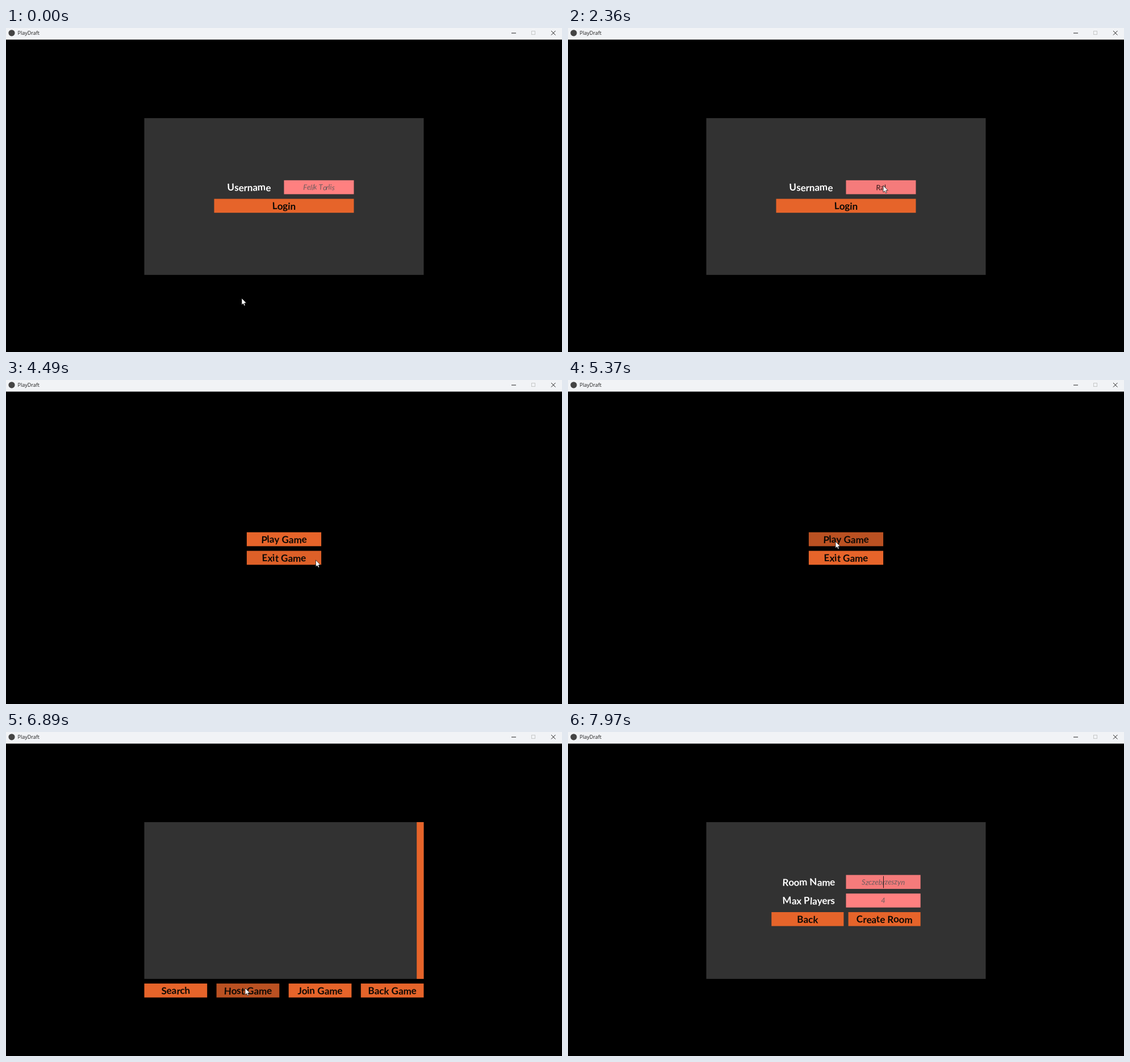
An HTML page with a canvas that plays this animation: 979 by 572 pixels, repeating every 8000 ms.

```html
<!DOCTYPE html>
<html lang="en">
<head>
<meta charset="utf-8">
<title>Game menu</title>
<style>
html, body { margin: 0; width: 100%; height: 100%; overflow: hidden; background: #000; }
canvas { display: block; width: 979px; height: 572px; }
</style>
</head>
<body>
<canvas id="stage" width="979" height="572"></canvas>
<script>
const ctx = document.getElementById('stage').getContext('2d');
const LOOP = 8000;
const ORANGE = [230, 100, 42], PINK = [255, 128, 128];
const LABEL = '700 17px Lato, sans-serif';
const INPUT = '13px Lato, sans-serif';

// Interface layout: everything is centred and measured in units
const UNIT = 0.82, CX = 489.5, CY = 297.5;
const ROW = 30 * UNIT, GAP = 10 * UNIT;
const PANEL_W = 600 * UNIT, PANEL_H = PANEL_W * 9 / 16;
const PANEL_X = CX - PANEL_W / 2, PANEL_Y = CY - PANEL_H / 2;
const rowY = (i, count) => CY - (count * (ROW + GAP) - GAP) / 2 + i * (ROW + GAP);

// Pointer glides between rests: start, end, evenly timed stops
const home = [415, 477];
const glides = [
  { from: 270, to: 1070, stops: [[551, 306], [555, 278]] },
  { from: 3170, to: 3210, stops: [[555, 284]] },
  { from: 3370, to: 3970, stops: [[550, 326], [546, 318]] },
  { from: 4450, to: 5290, stops: [[461, 298], [471, 285]] },
  { from: 5690, to: 5970, stops: [[488, 305], [482, 360], [350, 405]] },
  { from: 5970, to: 6530, stops: [[318, 430], [415, 444]] },
  { from: 6530, to: 6650, stops: [[421, 452]] },
  { from: 6930, to: 7610, stops: [[440, 410], [575, 268]] },
  { from: 7690, to: 7930, stops: [[930, 262]] }
];

const clamp = (v, lo, hi) => Math.min(hi, Math.max(lo, v));
const ease = u => u * u * (3 - 2 * u);

// Smooth curve through a, b with neighbours p, n
const curve = (p, a, b, n, u) => [0, 1].map(k => {
  const da = (b[k] - p[k]) / 2, db = (n[k] - a[k]) / 2, d = a[k] - b[k];
  return a[k] + u * (da + u * (-3 * d - 2 * da - db + u * (2 * d + da + db)));
});

function pointerAt(t) {
  let rest = home;
  for (const { from, to, stops } of glides) {
    if (t <= from) break;
    const pts = [rest, ...stops], last = pts.length - 1;
    const s = ease(clamp((t - from) / (to - from), 0, 1)) * last;
    const i = Math.min(Math.floor(s), last - 1);
    const at = j => pts[clamp(j, 0, last)];
    rest = curve(at(i - 1), at(i), at(i + 1), at(i + 2), s - i);
  }
  return rest;
}

let pointer = home;

const tint = (color, k) => `rgb(${color.map(c => Math.round(c * k)).join()})`;

function rect(x, y, w, h, fill) {
  ctx.fillStyle = fill;
  ctx.fillRect(x, y, w, h);
}

// Centred hand lettering: every letter leans and bounces a little
function lettering(str, x, y, font, fill) {
  ctx.font = font;
  ctx.fillStyle = fill;
  ctx.textAlign = 'left';
  const left = x - ctx.measureText(str).width / 2;
  [...str].forEach((ch, i) => {
    const sway = Math.sin(ch.charCodeAt(0) * 7 + i * 2.4);
    ctx.save();
    ctx.translate(left + ctx.measureText(str.slice(0, i)).width, y + sway * 0.5);
    ctx.rotate(sway * 0.05);
    ctx.fillText(ch, 0, 0);
    ctx.restore();
  });
}

function shadeFor(x, y, w) {
  const [px, py] = pointer;
  return px >= x && px < x + w && py >= y && py < y + ROW ? 0.96 : 1;
}

// Button darkening after a press
const pressed = (t, start, floor = 0.8) =>
  t < start ? 1 : Math.max(floor, 0.96 - (t - start) * 0.0037);

function button(label, x, y, w, press = 1) {
  rect(x, y, w, ROW, tint(ORANGE, Math.min(press, shadeFor(x, y, w))));
  lettering(label, x + w / 2, y + 18.8, LABEL, '#0b0805');
}

// Caption and input box sharing one row
function field(label, y, w, value, hint, caret) {
  const mid = CX + w / 2;
  lettering(label, CX - w / 2, y + 18.8, LABEL, '#fff');
  rect(CX, y, w, ROW, tint(PINK, caret ? 0.96 : shadeFor(CX, y, w)));
  if (value) lettering(value, mid, y + 17, INPUT, '#33191a');
  else lettering(hint, mid, y + 17, 'italic ' + INPUT, '#6e5c5e');
  if (caret) rect(Math.floor(mid), y + 2, 1, 21, '#201617');
}

const panel = () => rect(PANEL_X, PANEL_Y, PANEL_W, PANEL_H, '#323232');

function loginScreen(t) {
  const w = 150 * UNIT;
  const value = 'Ral'.slice(0, t < 1960 ? 0 : 1 + Math.floor((t - 1960) / 200));
  panel();
  field('Username', rowY(0, 2), w, value, 'Felik Torlis', t >= 1030 && t < 1510);
  button('Login', CX - w, rowY(1, 2), 2 * w, pressed(t, 4190, 0.89));
}

function menuScreen(t) {
  const w = 160 * UNIT;
  button('Play Game', CX - w / 2, rowY(0, 2), w, pressed(t, 5330));
  button('Exit Game', CX - w / 2, rowY(1, 2), w);
}

function lobbyScreen(t) {
  const bar = 15 * UNIT, w = 135 * UNIT, step = w + 2 * GAP;
  panel();
  rect(PANEL_X + PANEL_W - bar, PANEL_Y, bar, PANEL_H, tint(ORANGE, 1));
  ['Search', 'Host Game', 'Join Game', 'Back Game'].forEach((label, i) =>
    button(label, PANEL_X + i * step, PANEL_Y + PANEL_H + GAP, w,
      label === 'Host Game' ? pressed(t, 6850) : 1));
}

function roomScreen(t) {
  const w = 160 * UNIT, half = w - GAP / 2;
  panel();
  field('Room Name', rowY(0, 3), w, '', 'Szczebrzeszyn', t >= 7650);
  field('Max Players', rowY(1, 3), w, '', '4', false);
  button('Back', CX - w, rowY(2, 3), half);
  button('Create Room', CX + GAP / 2, rowY(2, 3), half);
}

function line(x1, y1, x2, y2) {
  ctx.beginPath();
  ctx.moveTo(x1, y1);
  ctx.lineTo(x2, y2);
  ctx.stroke();
}

function titleBar() {
  rect(0, 0, 979, 20.5, '#f1f3f6');
  ctx.fillStyle = '#444';
  ctx.beginPath();
  ctx.arc(10, 8.8, 5.6, 0, Math.PI * 2);
  ctx.fill();
  ctx.font = '9px "Open Sans", sans-serif';
  ctx.textAlign = 'left';
  ctx.fillStyle = '#1c1c1c';
  ctx.fillText('PlayDraft', 20.5, 12);
  ctx.lineWidth = 1;
  ctx.strokeStyle = '#c6c8c8';
  ctx.strokeRect(925.5, 5.5, 6, 6);
  ctx.strokeStyle = '#222';
  line(890, 9, 898, 9);
  line(960, 5, 967.5, 12.5);
  line(967.5, 5, 960, 12.5);
}

const arrow = new Path2D('M0 0V12L2.7 9.6L4.4 13.4L6.3 12.6L4.7 8.9L8.3 8.6Z');

function drawPointer() {
  ctx.save();
  ctx.translate(...pointer);
  ctx.fillStyle = '#fff';
  ctx.fill(arrow);
  ctx.strokeStyle = '#000';
  ctx.lineWidth = 0.7;
  ctx.stroke(arrow);
  ctx.restore();
}

function draw(t) {
  // Movement advances in 40 ms ticks
  pointer = pointerAt(10 + Math.floor((t - 10) / 40) * 40);
  rect(0, 0, 979, 572, '#000');
  titleBar();
  if (t < 4490) loginScreen(t);
  else if (t < 5410) menuScreen(t);
  else if (t < 6930) lobbyScreen(t);
  else roomScreen(t);
  if (t < 7970) drawPointer();
}

const start = performance.now();
function tick() {
  draw((performance.now() - start) % LOOP);
  requestAnimationFrame(tick);
}
tick();
</script>
</body>
</html>
```
